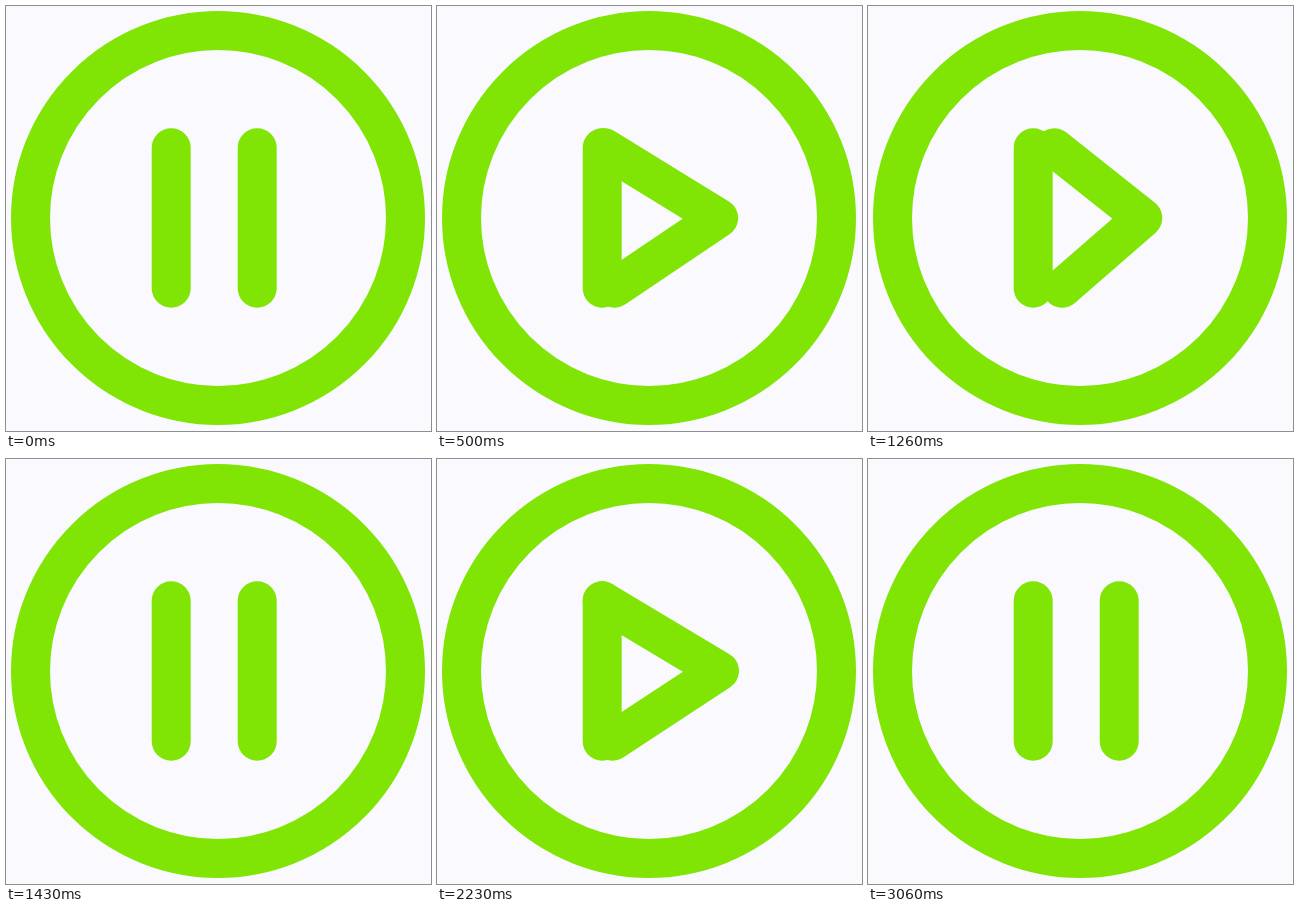
These frames come from a looping animation (425x425 px, 3.73 s). An HTML page:

```html
<!DOCTYPE html>
<html lang="en">
<head>
<meta charset="utf-8">
<title>Play and pause</title>
<style>
  html, body { margin: 0; width: 100%; height: 100%; overflow: hidden; background: #fafafe; }
  svg { display: block; width: 100%; height: 100%; }
</style>
</head>
<body>
<svg viewBox="0 0 425 425" fill="none" stroke="#80e505" stroke-width="39"
     stroke-linecap="round" stroke-linejoin="round">
  <circle cx="212" cy="212" r="187.5"/>
  <path d="M165.2 141.8V282.2"/>
  <polyline id="bar"/>
</svg>
<script>
  const LOOP = 3730;
  const FPS = 30;
  const bar = document.getElementById('bar');

  // x positions of the top, middle and bottom joints
  const PAUSE = [251.2, 251.2, 251.2];
  const PLAY = [165.2, 282.5, 175.5];
  const Y = [141.8, 212, 282.2];

  // 1 is play, 0 is pause
  const toggles = [
    { at: 350, dur: 190, to: 1 },
    { at: 1233.4, dur: 187, to: 0 },
    { at: 2019, dur: 190, to: 1 },
    { at: 2901, dur: 165, to: 0 }
  ];

  const bezier = (a, b, s) => 3 * a * s * (1 - s) ** 2 + 3 * b * s * s * (1 - s) + s ** 3;

  // cubic-bezier(.25, .1, .25, 1)
  function ease(x) {
    if (x <= 0) return 0;
    if (x >= 1) return 1;
    let lo = 0, hi = 1;
    for (let i = 0; i < 24; i++) {
      const mid = (lo + hi) / 2;
      if (bezier(0.25, 0.25, mid) < x) lo = mid; else hi = mid;
    }
    return bezier(0.1, 1, lo);
  }

  function playAmount(t) {
    let value = 0;
    for (const { at, dur, to } of toggles) {
      value += (to - value) * ease((t - at) / dur);
    }
    return value;
  }

  function draw(ms) {
    // the picture advances in whole steps of 1/30 s
    const t = Math.floor((ms % LOOP + 7) * FPS / 1000) * 1000 / FPS;
    const k = playAmount(t);
    const points = Y.map((y, i) => (PAUSE[i] + (PLAY[i] - PAUSE[i]) * k).toFixed(2) + ',' + y);
    bar.setAttribute('points', points.join(' '));
  }

  let start;
  function tick(now) {
    start ??= now;
    draw(now - start);
    requestAnimationFrame(tick);
  }
  draw(0);
  requestAnimationFrame(tick);
</script>
</body>
</html>
```
